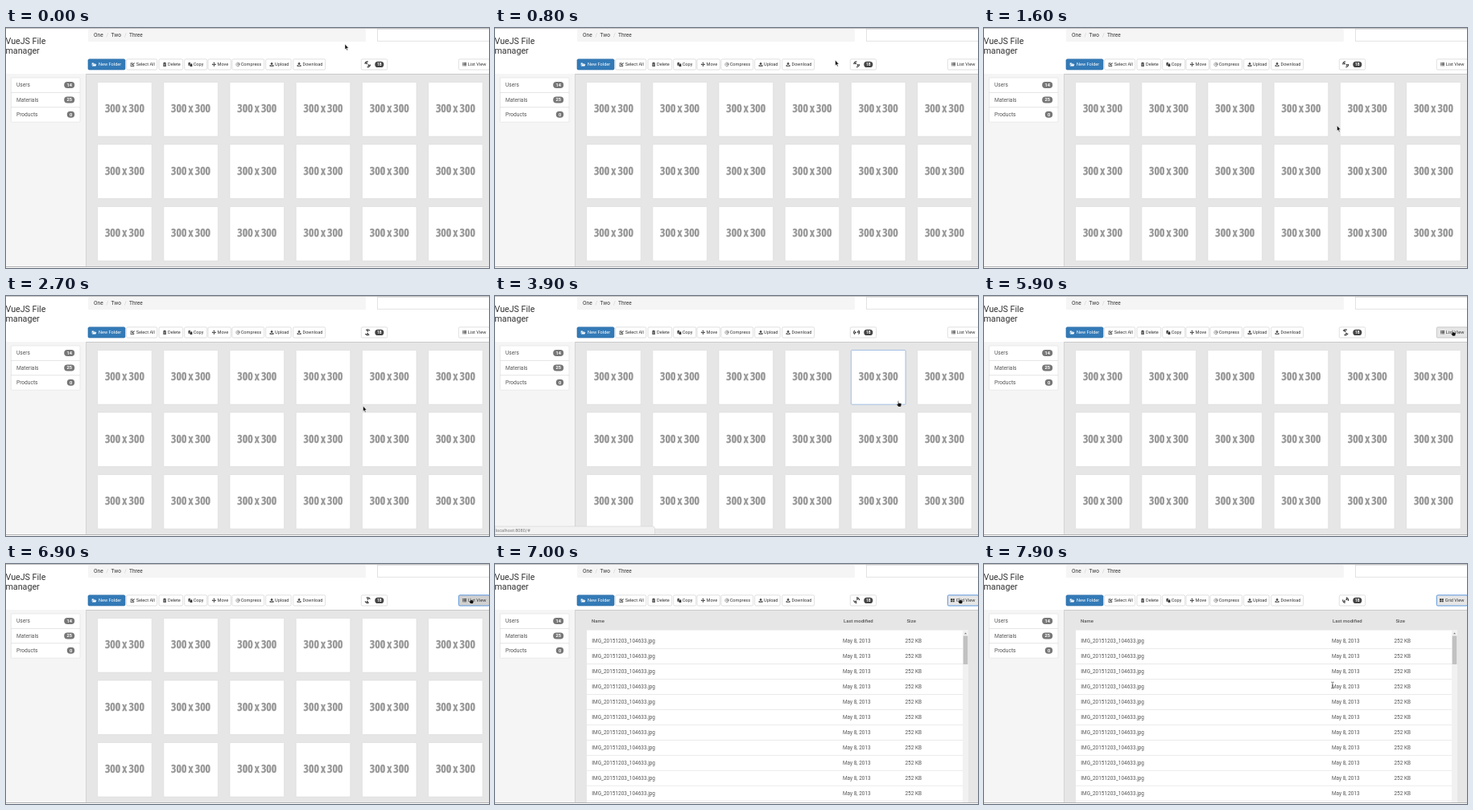
An HTML page that plays this animation: 600x299 px, repeating every 8000 ms.

```html
<!DOCTYPE html>
<html lang="en">
<head>
<meta charset="utf-8">
<title>File manager</title>
<style>
  html, body { margin: 0; width: 100%; height: 100%; overflow: hidden; background: #fff; }
  svg { display: block; width: 600px; height: 299px; }
  text { font-family: Roboto, sans-serif; fill: #333; white-space: pre; }
  .thumb { font-family: 'Open Sans Condensed', 'Open Sans', 'Roboto Condensed', sans-serif;
           font-stretch: 75%; font-weight: 700; word-spacing: -.1em; text-anchor: middle;
           fill: #969696; stroke: #969696; stroke-width: .3px; }
</style>
</head>
<body>
<svg id="stage" viewBox="0 0 600 299"></svg>
<script>
const LOOP = 8000, STEP = 100, SPIN = 1660;
const PRESS = 6700, SWITCH = 7000, STATUS = [3000, 5100];
const stage = document.getElementById('stage');

function add(parent, tag, attrs = {}, content = '') {
  const el = document.createElementNS('http://www.w3.org/2000/svg', tag);
  for (const key in attrs) el.setAttribute(key, attrs[key]);
  el.textContent = content;
  parent.append(el);
  return el;
}
const group = parent => add(parent, 'g');
const rect = (parent, x, y, width, height, fill, more) =>
  add(parent, 'rect', { x, y, width, height, fill, ...more });
const label = (parent, x, y, size, content, more) =>
  add(parent, 'text', { x, y, 'font-size': size, ...more }, content);
const show = (el, on) => el.setAttribute('visibility', on ? 'visible' : 'hidden');
const frame = (parent, x, y, w, h, stroke, rx = 1.5, fill = '#fff') =>
  rect(parent, x, y, w, h, fill, { stroke, 'stroke-width': .6, rx });

// Icons live in a box of about 6 by 6 units
const ICONS = {
  folder: 'M0 1h2.3l.5.7H5v.8H1.4L0 5zM1.7 2.9H6.4L5.2 5.5H.3z',
  check: 'M.4 1H3.7v.7H1v3.6h3.6V3.8h.7V6H.3V1zM1.5 2.7l.7-.6 1 .9L5.4.6l.7.6-2.9 3.3z',
  trash: 'M.4 1h1.4V.3h1.7V1h1.4v.7H.4zM.8 2h3.7v4H.8zM1.7 2.6v2.8h.4V2.6zM3.1 2.6v2.8h.4V2.6z',
  copy: 'M.2.5H3v1H2v3H.2zM2.4 2H5.5v4H2.4z',
  move: 'M3 0l1.2 1.4h-.8v1.2h1.2v-.8L6 3 4.6 4.2v-.8H3.4v1.2h.8L3 6 1.8 4.6h.8V3.4H1.4v.8L0 3l1.4-1.2v.8h1.2V1.4h-.8z',
  upload: 'M3 .2L5 2.4H3.7v1.7H2.3V2.4H1zM.2 4h1.6v.7h2.4V4h1.6v1.8H.2z',
  download: 'M2.3.2h1.4v1.7H5L3 4.1 1 1.9h1.3zM.2 4h1.2L3 5.1 4.6 4h1.2v1.8H.2z',
  list: 'M0 .8h1v1H0zM1.5.8H5.6v1H1.5zM0 2.5h1v1H0zM1.5 2.5H5.6v1H1.5zM0 4.2h1v1H0zM1.5 4.2H5.6v1H1.5z',
  grid: 'M0 .7h2.4v2H0zM2.9.7H5.3v2H2.9zM0 3.2h2.4v2H0zM2.9 3.2H5.3v2H2.9z'
};
const AT = 'M4.5 5.1A2.6 2.6 0 1 1 5.4 3.3Q5 4.5 4.2 4V2M4 3A1 1 0 1 1 2 3 1 1 0 1 1 4 3';
function icon(parent, name, x, y, fill = '#333') {
  const paint = name === 'at'
    ? { d: AT, fill: 'none', stroke: '#444', 'stroke-width': .55 }
    : { d: ICONS[name], fill, 'fill-rule': 'evenodd' };
  return add(parent, 'path', { ...paint, transform: `translate(${x} ${y}) scale(.9)` });
}
function badge(x, y, w, h, value, fill) {
  rect(stage, x, y, w, h, fill, { rx: h / 2 });
  label(stage, x + w / 2, y + h / 2 + 2, h * .7, value,
    { 'text-anchor': 'middle', 'font-weight': 700, style: 'fill:#fff' });
}

// Page shell
rect(stage, 0, 0, 600, 299, '#fff');
rect(stage, 0, 0, 600, .9, '#bbb');
rect(stage, 0, 57, 99, 240, '#f5f5f5');
rect(stage, 99, 57, 501, 240, '#e6e6e6');
rect(stage, 99, 57, 501, 1, '#cacaca');
rect(stage, 99, 57, 1, 240, '#d4d4d4');
label(stage, -.5, 19.6, 10.7, 'VueJS File');
label(stage, -.5, 31.6, 10.7, 'manager');

rect(stage, 102, 1, 345, 16, '#f5f5f5', { rx: 1.5 });
[['One', 109], ['Two', 130.5], ['Three', 153]].forEach(([word, x]) => label(stage, x, 11.2, 6.6, word));
[124.5, 147].forEach(x => label(stage, x, 11.2, 6.6, '/', { style: 'fill:#ccc' }));
frame(stage, 461.3, 1.5, 145, 14.7, '#d0d0d0', 0);

// Toolbar: text, icon, left, width, text x
[
  ['New Folder', 'folder', 102, 46, 115],
  ['Select All', 'check', 149.7, 38, 161.7],
  ['Delete', 'trash', 190, 29.7, 201],
  ['Copy', 'copy', 221.7, 28, 232.7],
  ['Move', 'move', 251, 28.5, 262.5],
  ['Compress', 'at', 281, 39.7, 291.7],
  ['Upload', 'upload', 322.7, 31.5, 334],
  ['Download', 'download', 356.7, 40, 368.5]
].forEach(([text, name, x, w, textX], i) => {
  const primary = i === 0;
  frame(stage, x, 38.8, w, 13.2, primary ? '#2e6da4' : '#ccc', 1.5, primary ? '#337ab7' : '#fff');
  icon(stage, name, x + 4.7, 42.6, primary ? '#fff' : '#333');
  label(stage, textX, 47.4, 5.6, text, primary ? { style: 'fill:#fff' } : {});
});

// Spinning sync sign: two short brackets with inward arrowheads
frame(stage, 441.3, 38.8, 32.4, 13.2, '#ccc');
const spinner = group(stage);
for (const turn of [0, 180]) {
  add(spinner, 'path', { d: 'M2.4-2.5Q4.6 0 2.4 2.5', transform: `rotate(${turn})`,
    fill: 'none', stroke: '#222', 'stroke-width': 1 });
  add(spinner, 'path', { d: 'M.3-.2L2.3-1.9V1.1z', transform: `rotate(${turn})`, fill: '#222' });
}
badge(458.3, 41.8, 11, 7.2, '18', '#444');

const viewButton = frame(stage, 562.3, 38.8, 38.2, 13.2, '#ccc');
const listLabel = group(stage), gridLabel = group(stage);
icon(listLabel, 'list', 567, 42.6);
label(listLabel, 573.8, 47.4, 5.6, 'List View');
icon(gridLabel, 'grid', 566, 42.6);
label(gridLabel, 572.7, 47.4, 5.6, 'Grid View');

// Sidebar
[['Users', '14'], ['Materials', '25'], ['Products', '0']].forEach(([name, count], i) => {
  const y = 62 + i * 18.4, w = count.length > 1 ? 13 : 9.4;
  frame(stage, 6.3, y, 85.7, 18.4, '#ddd', i === 1 ? 0 : 1);
  label(stage, 13, y + 11.2, 6.6, name, { style: 'fill:#555' });
  badge(85.2 - w, y + 5, w, 8, count, '#777');
});

// Thumbnail grid
const grid = group(stage), cards = [];
const CARD = 67.6;
for (let i = 0; i < 18; i++) {
  const x = 113.6 + (i % 6) * 82.2, y = 67.5 + Math.floor(i / 6) * 77.5;
  cards.push({ x, y, el: frame(grid, x, y, CARD, CARD, '#d8d8d8', 1) });
  label(grid, x + CARD / 2, y + 38.5, 16, '300 x 300', { class: 'thumb' });
}
const thumbs = [...grid.querySelectorAll('text')];
const thumbSize = Math.min(16, 16 * 49 / thumbs[0].getComputedTextLength());
thumbs.forEach(el => {
  el.setAttribute('font-size', thumbSize);
  el.setAttribute('dy', (thumbSize - 16) * .36);
});

// Table view
const table = group(stage);
[['Name', 120], ['Last modified', 433], ['Size', 511.5]].forEach(([head, x]) =>
  label(table, x, 73.3, 6, head, { 'font-weight': 500, style: 'fill:#555' }));
rect(table, 114, 82.5, 474, 214.5, '#fff');
for (let i = 0; i < 11; i++) {
  const y = 98.2 + i * 18.95;
  [['IMG_20151203_104633.jpg', 120.3], ['May 8, 2013', 432], ['252 KB', 509.5]].forEach(([cell, x]) =>
    label(table, x, y, 6.45, cell, { style: 'fill:#555' }));
  rect(table, 114, y + 7.1, 467, .6, '#ddd');
}
rect(table, 581, 82.5, 7, 214.5, '#f1f1f1');
rect(table, 581.7, 89.5, 5.6, 35.5, '#c1c1c1');
add(table, 'path', { d: 'M583 87.2l1.5-1.8 1.5 1.8z', fill: '#777' });

// Link hint and window edge
const hint = group(stage);
add(hint, 'path', { d: 'M0 287H195.5Q198.5 287 198.5 290V297H0z', fill: '#f2f2f2', stroke: '#d2d2d2', 'stroke-width': .6 });
label(hint, .5, 293.7, 5.7, 'localhost:8080/#', { style: 'fill:#777' });
rect(stage, 0, 297, 600, 1, '#b0b0b0');

// Pointers
const outline = { fill: '#111', stroke: '#fff', 'stroke-width': .5 };
const pointer = group(stage);
const shapes = {
  arrow: add(pointer, 'path', { d: 'M0 0V6.8L1.5 5.5 2.5 7.9 3.6 7.4 2.6 5.1H4.6z', ...outline }),
  hand: add(pointer, 'path', { d: 'M1.3 0H2.4V2.5L5.8 3.1V5.3L5 7.4H2L0 4.8V3.6L1.3 4.1z',
    transform: 'translate(-.9 -.3)', ...outline }),
  beam: add(pointer, 'path', { d: 'M-1.8-3.8H-.5L0-3.3.5-3.8H1.8M0-3.3V3.3M-1.8 3.8H-.5L0 3.3.5 3.8H1.8',
    fill: 'none', stroke: '#444', 'stroke-width': .7 })
};

// time, x, y
const PATH = [
  [0, 421, 20], [400, 421, 20], [700, 422, 34], [1000, 424, 52], [1200, 430, 68],
  [1600, 438.5, 121.5], [1900, 443.5, 137.5], [2700, 443.5, 137], [2800, 450, 136.5],
  [3000, 466, 133.5], [3500, 500, 131], [3900, 500, 131], [4200, 527, 102],
  [4500, 580, 48], [4600, 584.5, 43], [5700, 584.5, 43], [6200, 576, 42.5],
  [7300, 576, 42.5], [7600, 510, 88], [7800, 445, 142], [7900, 433, 151], [8000, 433, 151]
];
function pointerAt(t) {
  const i = PATH.findIndex(p => p[0] > t);
  const [t0, x0, y0] = PATH[i - 1], [t1, x1, y1] = PATH[i];
  const k = (t - t0) / (t1 - t0);
  return [x0 + (x1 - x0) * k, y0 + (y1 - y0) * k];
}
const inside = (px, py, x, y, w, h) => px >= x && px <= x + w && py >= y && py <= y + h;

function draw(now) {
  const t = Math.floor((now % LOOP) / STEP) * STEP;
  const [x, y] = pointerAt(t);
  const tableOpen = t >= SWITCH;
  show(grid, !tableOpen);
  show(table, tableOpen);
  show(listLabel, !tableOpen);
  show(gridLabel, tableOpen);
  show(hint, t >= STATUS[0] && t < STATUS[1]);

  let onCard = false;
  for (const card of cards) {
    const over = !tableOpen && inside(x, y, card.x, card.y, CARD, CARD);
    card.el.setAttribute('stroke', over ? '#6f9fd8' : '#d8d8d8');
    onCard ||= over;
  }

  const onButton = inside(x, y, 562, 39, 38, 13);
  const focused = t >= PRESS, pressed = focused && !tableOpen;
  viewButton.setAttribute('fill', pressed ? '#d0d0d0' : onButton || focused ? '#e6e6e6' : '#fff');
  viewButton.setAttribute('stroke', focused ? '#5b95dc' : onButton ? '#adadad' : '#ccc');
  viewButton.setAttribute('stroke-width', focused ? 1 : .6);

  const kind = t >= 7900 ? 'beam' : onCard || onButton ? 'hand' : 'arrow';
  for (const name in shapes) show(shapes[name], name === kind);
  pointer.setAttribute('transform', `translate(${x} ${y})`);
  spinner.setAttribute('transform', `translate(449.2 45.2) rotate(${t / SPIN * 360 + 54})`);
}

const start = performance.now();
function tick() {
  draw(performance.now() - start);
  requestAnimationFrame(tick);
}
tick();
</script>
</body>
</html>
```
